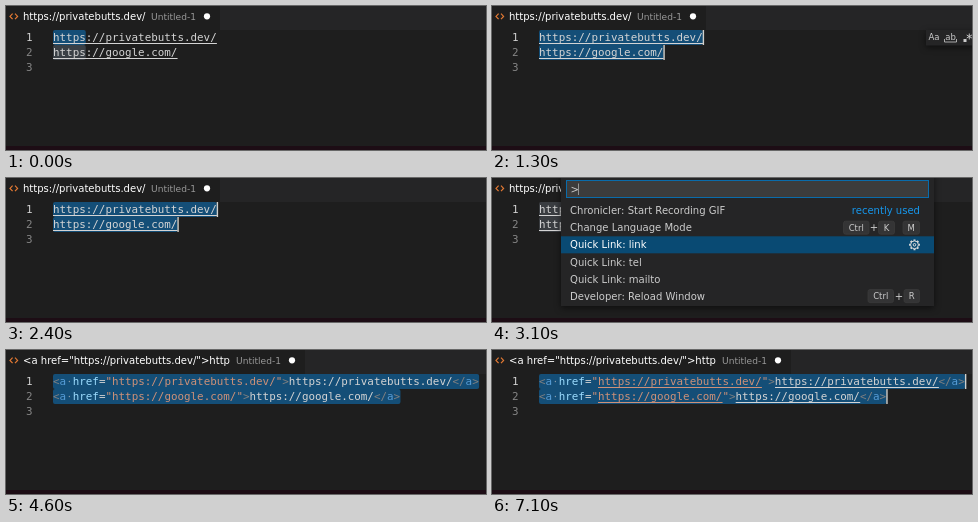
An HTML page that plays this animation: 480 px wide and 144 px high, repeating every 7.2 s.

```html
<!DOCTYPE html>
<html lang="en">
<head>
<meta charset="utf-8">
<title>Quick links</title>
<style>
  html, body { margin: 0; width: 100%; height: 100%; overflow: hidden; background: #1e1e1e; }
  svg { display: block; width: 480px; height: 144px; }
  text { white-space: pre; font: 10.05px "DejaVu Sans", sans-serif; fill: #ccc; }
  .code { font: 10.89px "DejaVu Sans Mono", monospace; fill: #d4d4d4; }
  .small { font-size: 9.08px; fill: #999; }
  .key { font-size: 8.5px; text-anchor: middle; }
  .shadow { filter: drop-shadow(0 2px 3px #0008); }
</style>
</head>
<body>
<svg id="stage" viewBox="0 0 480 144"></svg>
<script>
const LOOP = 7200, LEFT = 47, CHAR = 6.556, ROW = 15, TOP = 24;
const urls = ['https://privatebutts.dev/', 'https://google.com/'];
const commands = ['Chronicler: Start Recording GIF', 'Change Language Mode', 'Quick Link: link',
  'Quick Link: tel', 'Quick Link: mailto', 'Developer: Reload Window'];
const stage = document.getElementById('stage');

const esc = s => s.replace(/&/g, '&amp;').replace(/</g, '&lt;');
const rect = (x, y, w, h, fill, extra = '') =>
  `<rect x="${x}" y="${y}" width="${w}" height="${h}" fill="${fill}" ${extra}/>`;
const text = (x, y, s, extra = '') => `<text x="${x}" y="${y}" ${extra}>${esc(s)}</text>`;
const path = (d, stroke, w = 1) => `<path d="${d}" fill="none" stroke="${stroke}" stroke-width="${w}"/>`;
const span = (s, fill) => `<tspan fill="${fill}">${esc(s)}</tspan>`;
const col = n => LEFT + n * CHAR;

// Cursor blink: 500 ms on, 500 ms off, restarted by each edit
const blink = (t, start) => (t - start) % 1000 < 500;

function stateAt(t) {
  const wrapped = t >= 3700;
  const palette = t >= 2600 && !wrapped;
  const start = wrapped ? 3700 : t >= 1300 ? 1300 : 100;
  return {
    wrapped, palette,
    both: t >= 100,
    full: t >= 1300,
    caret: t >= 100 && !palette && blink(t, start),
    links: !wrapped || t >= 4700,
    options: t >= 100 && t < 2100,
    picked: t < 2900 ? 0 : t < 3100 ? 1 : 2
  };
}

function tab(s) {
  const title = s.wrapped ? `<a href="${urls[0]}">http` : urls[0];
  const shift = s.wrapped ? 85 : 0;
  return rect(0, 0, 480, TOP, '#252526') + rect(0, 0, 214 + shift, TOP, '#1e1e1e') +
    path('M6.6 7.6L4 10.4L6.6 13.2M9 7.6L11.6 10.4L9 13.2', '#e37933', 1.2) +
    text(17, 13.6, title, 'style="fill:#fff"') +
    text(145 + shift, 13.6, 'Untitled-1', 'class="small"') +
    `<circle cx="${201 + shift}" cy="10.3" r="3.1" fill="#fff"/>`;
}

function markup(url) {
  const gray = '#808080', blue = '#569cd6', string = '#ce9178';
  return span('<', gray) + span('a', blue) + ' ' + span('href', '#9cdcfe') + '=' +
    span(`"${url}"`, string) + span('>', gray) + url +
    span('</', gray) + span('a', blue) + span('>', gray);
}

function line(url, i, s) {
  const top = TOP + i * ROW, n = url.length;
  const end = s.wrapped ? 2 * n + 15 : s.full ? n : 5;
  const fill = s.palette ? '#3a3d41' : i && !s.both ? '#3a4046' : '#144e77';
  const underline = (from, color) => rect(col(from), top + 13, n * CHAR, 1, color);
  let out = rect(LEFT, top, end * CHAR, ROW, fill, 'rx="2"') +
    `<text class="code" x="${LEFT}" y="${top + 11}">${s.wrapped ? markup(url) : url}</text>`;
  if (s.wrapped) out += `<circle cx="${col(2.5)}" cy="${top + 7.5}" r=".7" fill="#8a9dab"/>`;
  if (s.links) out += s.wrapped
    ? underline(9, '#ce9178') + underline(n + 11, '#d4d4d4')
    : underline(0, '#d4d4d4');
  if (s.caret) out += rect(col(end) - 0.2, top, 1.4, ROW, '#d0d0cc');
  return out;
}

function optionsBox() {
  return `<g class="shadow">${rect(434, 24, 50, 15.5, '#252526')}</g>` +
    text(442, 34.3, 'Aa', 'class="key"') + text(458.5, 33.8, 'ab', 'class="key"') +
    path('M452.5 33V36H464.5V33', '#ccc', 0.8) + rect(471.5, 33, 3, 3, '#ccc') +
    path('M477.3 27.5V33.5M474.7 29L479.9 32M479.9 29L474.7 32', '#ccc', 0.9);
}

const key = (x, y, w, s) =>
  rect(x, y - 6.5, w, 13, '#343435', 'rx="2" stroke="#3d3d3d" stroke-width=".7"') +
  text(x + w / 2, y + 3.1, s, 'class="key"');

function gear(x, y) {
  let teeth = '';
  for (let i = 0; i < 8; i++) {
    const a = i * Math.PI / 4, c = Math.cos(a), d = Math.sin(a);
    teeth += `M${x + 4 * c} ${y + 4 * d}L${x + 5.4 * c} ${y + 5.4 * d}`;
  }
  const ring = r => `<circle cx="${x}" cy="${y}" r="${r}" fill="none" stroke="#ddd"/>`;
  return path(teeth, '#ddd', 2) + ring(3.9) + ring(1.3);
}

function paletteBox(picked) {
  const mid = i => 32.6 + 17.1 * i;
  let out = `<g class="shadow">${rect(69, -4, 373, 132, '#252526')}</g>` +
    rect(74.5, 2.5, 362, 17, '#3c3c3c', 'stroke="#0a6cab"') +
    text(78.5, 14.5, '>') + rect(86, 5.5, 0.8, 11.5, '#aaa') +
    rect(69, mid(picked) - 8.5, 373, 17, '#094a73');
  commands.forEach((name, i) => {
    out += text(78, mid(i) + 3.6, name, i === picked ? 'style="fill:#fff"' : '');
  });
  out += text(428, mid(0) + 3.6, 'recently used', 'text-anchor="end" style="fill:#1697ec"');
  out += key(351.5, mid(1), 25.5, 'Ctrl') + text(382, mid(1) + 3.5, '+', 'text-anchor="middle"') +
    key(386.5, mid(1), 16, 'K') + key(411, mid(1), 16.5, 'M');
  out += key(376, mid(5), 25.5, 'Ctrl') + text(407, mid(5) + 3.5, '+', 'text-anchor="middle"') +
    key(412, mid(5), 15.5, 'R');
  return out + (picked === 2 ? gear(422.5, mid(2)) : '');
}

function draw(s) {
  let out = rect(0, 0, 480, 144, '#1e1e1e') + tab(s);
  for (let i = 0; i < 3; i++)
    out += text(20, TOP + i * ROW + 11.2, String(i + 1), `class="code" style="fill:${i ? '#858585' : '#d0d0d0'}"`);
  out += urls.map((url, i) => line(url, i, s)).join('');
  if (s.options) out += optionsBox();
  out += rect(0, 140, 480, 4, '#1d0d15');
  if (s.palette) out += paletteBox(s.picked);
  stage.innerHTML = out;
}

let last = '';
function tick() {
  const s = stateAt(performance.now() % LOOP), id = JSON.stringify(s);
  if (id !== last) draw(s);
  last = id;
  requestAnimationFrame(tick);
}
tick();
</script>
</body>
</html>
```
